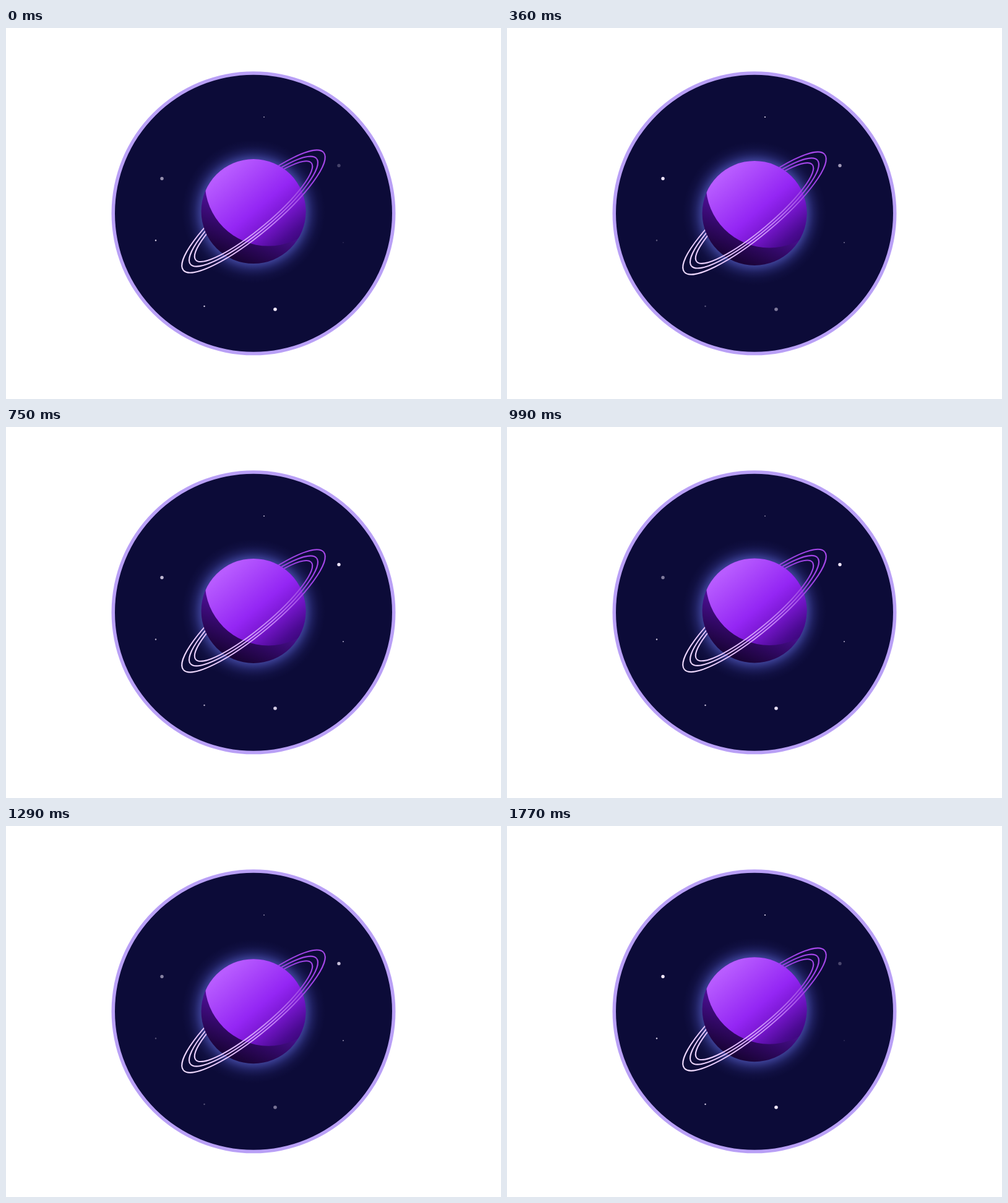
Write an HTML page with a canvas that moves like this. It is 800 px wide and 600 px high and loops after 1.8 s.

```html
<!DOCTYPE html>
<html lang="en">
<head>
<meta charset="utf-8">
<title>Ringed planet</title>
<style>
html, body { margin: 0; width: 100%; height: 100%; overflow: hidden; background: #fff; }
canvas { display: block; }
</style>
</head>
<body>
<canvas id="stage" width="800" height="600"></canvas>
<script>
const ctx = document.getElementById('stage').getContext('2d');
const LOOP = 1800, STEP = 30, TAU = Math.PI * 2;
const R = 84.5, TILT = -40 * Math.PI / 180;

function fade(gradient, stops) {
  for (const [at, color] of stops) gradient.addColorStop(at, color);
  return gradient;
}

const glow = fade(ctx.createRadialGradient(0, 0, 80, 0, 0, 116), [
  [0, 'rgba(98,108,220,.66)'], [.2, 'rgba(90,98,210,.5)'], [.45, 'rgba(76,82,190,.26)'],
  [.72, 'rgba(60,64,160,.09)'], [1, 'rgba(50,54,140,0)']]);
const lit = fade(ctx.createLinearGradient(-51, -61, 51, 61), [
  [0, '#b85cff'], [.5, '#9426f4'], [.7, '#7a17d2'], [.92, '#4b0a92'], [1, '#3f0880']]);
const shade = fade(ctx.createLinearGradient(0, 0, -32, 74), [
  [0, '#50109a'], [.5, '#34096a'], [1, '#1a0338']]);
const ringColor = fade(ctx.createLinearGradient(-148, 0, 148, 0), [
  [0, '#f0dcfc'], [.3, '#deb8fa'], [.55, '#bd7cf4'], [.8, '#9a40e2'], [1, '#a848ea']]);

// Half-axes of the rings, outermost first
const rings = [[148, 36], [133, 32], [122, 28]];

// Twinkle rhythms, each giving 0 to 1
const swing = t => (1 + Math.cos(TAU * t / 900)) / 2;
const swell = t => Math.sin(Math.PI * t / LOOP) ** 1.2;
const drift = t => (1 + Math.cos(TAU * (t - 450) / 1350)) / 2;

// x, y, radius, dimmest, brightest, rhythm
const stars = [
  [417, 144, 1.1, .42, .95, drift],
  [252, 243.5, 2.7, .46, 1, drift],
  [538, 222.5, 2.7, .25, 1, swell],
  [545, 347, 1.1, .12, .7, swell],
  [242, 343.5, 1.2, .3, .9, swing],
  [320.5, 450, 1.2, .3, .9, swing],
  [435, 455, 2.8, .45, 1, swing]
];

function disc(x, y, r, fill) {
  ctx.beginPath();
  ctx.arc(x, y, r, 0, TAU);
  ctx.fillStyle = fill;
  ctx.fill();
}

function halfRings(from) {
  ctx.save();
  ctx.rotate(TILT);
  ctx.strokeStyle = ringColor;
  ctx.lineWidth = 2;
  for (const [a, b] of rings) {
    ctx.beginPath();
    ctx.ellipse(0, 0, a, b, 0, from, from + Math.PI);
    ctx.stroke();
  }
  ctx.restore();
}

function planet() {
  disc(0, 0, R, shade);
  ctx.save();
  ctx.beginPath();
  ctx.arc(0, 0, R, 0, TAU);
  ctx.clip();
  disc(24, -46.5, 102.5, lit);
  ctx.restore();
}

function draw(t) {
  ctx.fillStyle = '#fff';
  ctx.fillRect(0, 0, 800, 600);
  disc(400, 299.8, 229.5, '#b9a0f6');
  disc(400, 299.8, 224, '#0c0b38');

  for (const [x, y, r, low, high, rhythm] of stars) {
    ctx.globalAlpha = low + (high - low) * rhythm(t);
    disc(x, y, r, '#f4eaff');
  }
  ctx.globalAlpha = 1;

  ctx.save();
  ctx.translate(400, 296.6 + 3.2 * (1 - swing(t)));
  disc(0, 0, 116, glow);
  halfRings(Math.PI);
  planet();
  halfRings(0);
  ctx.restore();
}

const start = performance.now();
function tick() {
  const t = (performance.now() - start) % LOOP;
  draw(Math.floor(t / STEP) * STEP);
  requestAnimationFrame(tick);
}
tick();
</script>
</body>
</html>
```
